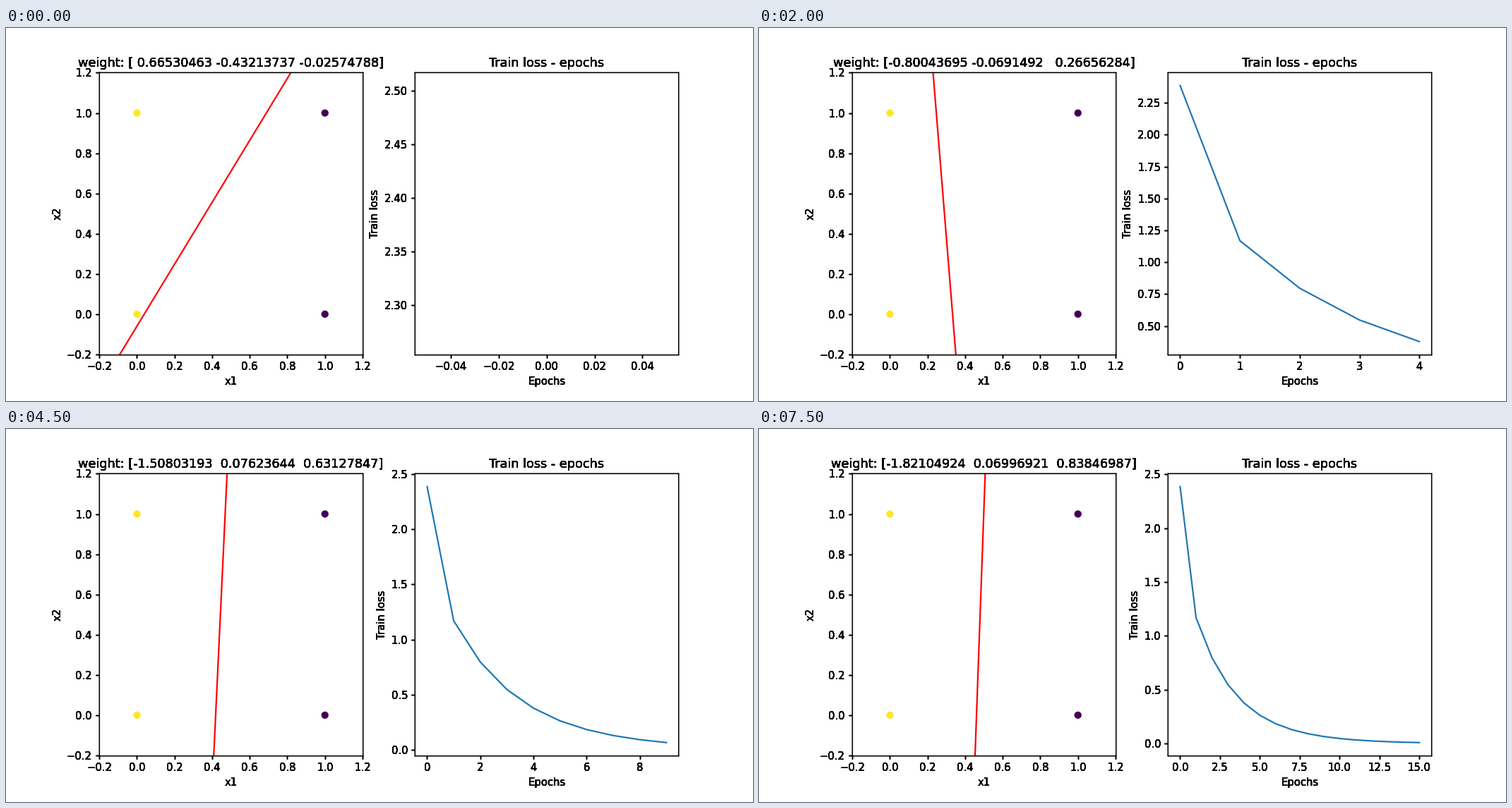
Animation of 1058 by 529 pixels, one loop 8000 ms. Source, as a matplotlib script:

```python
import numpy as np
import matplotlib.pyplot as plt
from matplotlib.animation import FuncAnimation
from matplotlib.axes import Axes

plt.rcParams["font.family"] = "DejaVu Sans"

EPOCHS = 16
RATE = 0.2
LOW, HIGH = -0.2, 1.2
PASSES = 8

points = np.array([[0, 0], [0, 1], [1, 0], [1, 1]])
labels = np.array([1, 1, -1, -1])
inputs = np.column_stack([points, np.ones(4)])
batches = [[1, 2], [0, 3]]


class InkedAxes(Axes):
    """Draws itself repeatedly, so soft edges outside the patch turn solid."""

    def draw(self, renderer):
        for _ in range(PASSES):
            super().draw(renderer)


def train(weight, loss):
    """Mini-batch gradient descent; batch loss is taken after each step."""
    weights, losses = [weight], [loss]
    for _ in range(EPOCHS - 1):
        batch_losses = []
        for batch in batches:
            x, y = inputs[batch], labels[batch]
            weight = weight + RATE * x.T @ (y - x @ weight)
            batch_losses.append(np.mean((y - x @ weight) ** 2))
        weights.append(weight)
        losses.append(np.mean(batch_losses))
    return weights, losses


weights, losses = train(
    np.array([0.6653046285, -0.43213737, -0.0257478752]), 2.3854936)

fig, (plane, curve) = plt.subplots(1, 2, figsize=(10, 5), dpi=105.8,
                                   subplot_kw={"axes_class": InkedAxes})
fig.subplots_adjust(left=0.125, right=0.9, bottom=0.125, top=0.88, wspace=0.2)

plane.scatter(points[:, 0], points[:, 1], c=labels)
plane.set(xlim=(LOW, HIGH), ylim=(LOW, HIGH), xlabel="x1", ylabel="x2")
boundary, = plane.plot([], [], color="red")

curve.set(title="Train loss - epochs", xlabel="Epochs", ylabel="Train loss")
loss_line, = curve.plot([], [])


def draw(epoch):
    w1, w2, bias = weights[epoch]
    x2 = np.array([LOW, HIGH])
    boundary.set_data(-(w2 * x2 + bias) / w1, x2)
    plane.set_title(f"weight: {weights[epoch]}")

    loss_line.set_data(range(epoch + 1), losses[:epoch + 1])
    curve.relim()
    curve.autoscale_view()
    return boundary, loss_line


anim = FuncAnimation(fig, draw, frames=EPOCHS, interval=500,
                     repeat=True, repeat_delay=0)
plt.show()
```
